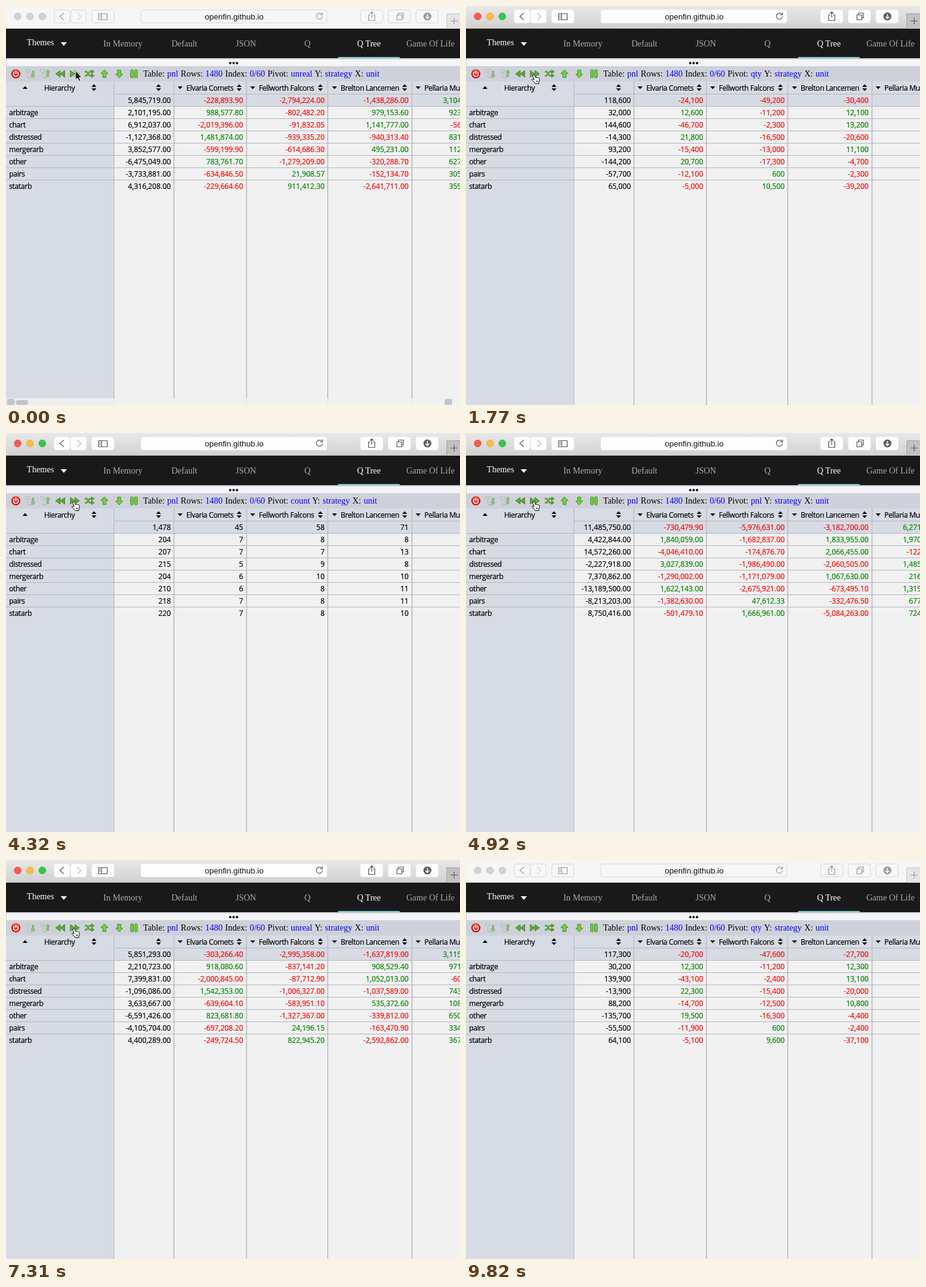
These frames come from a looping animation (738x650 px, 9920 ms). An HTML page:

```html
<!DOCTYPE html>
<html lang="en">
<head>
<meta charset="utf-8">
<title>Pivot grid</title>
<style>
  html, body { margin: 0; width: 100%; height: 100%; overflow: hidden; background: #f1f1f1; }
  svg { display: block; }
  text { white-space: pre; }
  .grid text {
    font: 11.8px "Open Sans", "Noto Sans", sans-serif;
    fill: currentColor; stroke: currentColor; stroke-width: .22px;
  }
  .grid .label { letter-spacing: -.33px; }
  .num { text-anchor: end; }
  .nav text, .status { font: 14px "Liberation Serif", "Times New Roman", serif; }
  .nav text { fill: #a9a9a9; text-anchor: middle; }
  .nav .lit { fill: #fff; }
  .status { word-spacing: .7px; }
  .status tspan { fill: #00f; }
  .url { font: 13px "Liberation Sans", Arial, sans-serif; fill: #111; text-anchor: middle; }
  .btn { fill: #fdfdfd; stroke: #f6f6f6; }
  .glyph { fill: none; stroke: #5a5a5a; stroke-width: 1.2; }
  .solid { fill: #5f5f5f; stroke: none; }
  .edge { fill: #b4b3b4; }
  .tab { fill: #c2c1c2; stroke: #a3a3a3; }
  .idle .bar { fill: #f6f6f6; }
  .idle .btn { fill: #f7f7f7; stroke: #d9d9d9; }
  .idle .glyph { stroke: #9b9b9b; }
  .idle .solid { fill: #9b9b9b; stroke: none; }
  .idle .edge { fill: #dadada; }
  .idle .tab { fill: #e4e4e4; stroke: #c8c8c8; }
  .idle .lamp { fill: #d2d2d2; stroke: #c2c2c2; }
  .green { fill: #74cf3a; stroke: #3c8a22; stroke-width: .9; stroke-linejoin: round; }
  .deep { fill: #5fa63e; }
  .faint { opacity: .65; }
  .dash { fill: none; stroke: #8aa087; stroke-dasharray: 1.5 1; }
</style>
</head>
<body>
<svg id="stage" width="738" height="650" viewBox="0 0 738 650">
  <defs>
    <linearGradient id="chrome" x2="0" y2="1">
      <stop stop-color="#e9e8e9"/><stop offset="1" stop-color="#d2d1d2"/>
    </linearGradient>
    <radialGradient id="red" cy=".3">
      <stop stop-color="#ff6a60"/><stop offset="1" stop-color="#d01414"/>
    </radialGradient>
    <path id="down" d="M-4 -2H4L0 2.5Z"/>
    <path id="sort" d="M-4 -1.2H4L0 -5.5ZM-4 1.2H4L0 5.5Z"/>
    <path id="skip" d="M-7.5 -5.5L0 0L-7.5 5.5ZM0 -5.5L7.5 0L0 5.5Z"/>
    <path id="arrow" d="M0 -6.5L6 -.5H2.7V6H-2.7V-.5H-6Z"/>
    <path id="small" d="M0 -6L3.2 -2H1.3V5H-1.3V-2H-3.2Z"/>
    <path id="boxes" class="dash" d="M.5 .5H6.5V5H.5ZM3.5 5V13H9M6.5 8.5H9.5V14.5H4"/>
    <path id="cross" d="M128 107H131L136 113.5H140M128 113.5H131L136 107H140" fill="none"/>
  </defs>

  <g id="window">
    <rect class="bar" width="738" height="37" fill="url(#chrome)"/>
    <rect class="edge" id="edge" y="36" width="738" height="1"/>
    <circle class="lamp" cx="19" cy="17" r="5.7" fill="#fc5753" stroke="#df4744" stroke-width=".7"/>
    <circle class="lamp" cx="39" cy="17" r="5.7" fill="#fdbc40" stroke="#de9f34" stroke-width=".7"/>
    <circle class="lamp" cx="59" cy="17" r="5.7" fill="#34c84a" stroke="#27aa35" stroke-width=".7"/>
    <g id="buttons"></g>
    <path class="glyph" d="M94 11.5L87.5 17L94 22.5"/>
    <path class="glyph" opacity=".4" d="M116 11.5L122 17L116 22.5"/>
    <path class="glyph" d="M150.5 12.5H164.5V22.5H150.5ZM155.5 12.5V22.5M152 15H154M152 17H154M152 19H154"/>
    <text class="url" x="371" y="22">openfin.github.io</text>
    <path class="glyph" d="M513.5 13.5A5 5 0 1 0 514.5 17M514.5 10.5V14.5H510.5"/>
    <path class="glyph" d="M592 14.5H589.5V23.5H599.5V14.5H597M594.5 19V9.5M591.5 12.5L594.5 9.5L597.5 12.5"/>
    <path class="glyph" d="M635.5 14.5H643.5V22.5H635.5ZM638 14V11.5H646V19.5H644"/>
    <circle class="glyph solid" cx="685" cy="17" r="6.5"/>
    <path d="M685 13V20M682 17.5L685 20.5L688 17.5" fill="none" stroke="#fff" stroke-width="1.5"/>
    <rect class="tab" x="716.5" y="12.5" width="24" height="25"/>
    <path class="glyph" d="M723 24.5H734M728.5 19V30"/>
  </g>

  <g class="nav" id="nav">
    <rect y="37" width="738" height="48" fill="#191919"/>
    <rect x="540" y="83" width="100" height="2" fill="#76c7cb"/>
    <text class="lit" x="56" y="64">Themes</text>
    <path d="M89 59H99L94 65Z" fill="#fff"/>
  </g>

  <rect y="85" width="738" height="14" fill="#d0d2da"/>
  <rect x="1" y="87" width="737" height="11" fill="#f5f5f7"/>
  <path d="M364.5 93h.01M370 93h.01M375.5 93h.01" stroke="#111" stroke-width="4" stroke-linecap="round"/>
  <rect y="98" width="738" height="25" fill="#cfd1da"/>

  <g id="tools">
    <circle cx="16" cy="110.5" r="7.5" fill="url(#red)"/>
    <path d="M13.5 107.7A4 4 0 1 0 18.5 107.7M16 105.5V110.5" fill="none" stroke="#fff" stroke-width="1.5"/>
    <g class="faint">
      <use href="#boxes" x="32" y="103"/>
      <use href="#small" class="green" transform="translate(44 111) rotate(180)"/>
      <use href="#boxes" x="56" y="103"/>
      <use href="#small" class="green" transform="translate(68 110)"/>
    </g>
    <use href="#skip" class="green deep" transform="translate(88 110.5) scale(-1 1)"/>
    <use href="#skip" class="green deep" transform="translate(112 110.5)"/>
    <use href="#cross" stroke="#3c8a22" stroke-width="2.4"/>
    <use href="#cross" stroke="#74cf3a"/>
    <path class="green deep" d="M139 104L143.5 107L139 110ZM139 110.5L143.5 113.5L139 116.5Z"/>
    <use href="#arrow" class="green" transform="translate(160 110.5)"/>
    <use href="#arrow" class="green" transform="translate(184 110.5) rotate(180)"/>
    <rect class="green" x="202.5" y="104" width="4.5" height="13" rx="1.5"/>
    <rect class="green" x="209" y="104" width="4.5" height="13" rx="1.5"/>
  </g>
  <text class="status" x="223" y="115">Table: <tspan>pnl</tspan> Rows: <tspan>1480</tspan> Index: <tspan>0/60</tspan> Pivot: <tspan id="pivot">unreal</tspan> Y: <tspan>strategy</tspan> X: <tspan>unit</tspan></text>

  <g class="grid" id="grid">
    <rect y="123" width="738" height="527" fill="#f1f1f1"/>
    <rect y="123" width="738" height="40" fill="#d7dbe3"/>
    <rect y="123" width="175" height="527" fill="#d7dbe3"/>
    <path id="columns" fill="none" stroke="#c3c6cd" stroke-width="2"/>
    <path id="rows" fill="none" stroke="#b2b6be"/>
    <text class="label" x="62" y="138">Hierarchy</text>
    <use href="#down" transform="translate(31 133) scale(1 -1)"/>
    <use href="#sort" x="143" y="133"/>
    <use href="#sort" x="248" y="133"/>
  </g>

  <g id="scroll">
    <rect x="1" y="639" width="724" height="11" fill="#f1f1f1" opacity=".85"/>
    <g fill="#c0c6cc">
      <rect x="2" y="640" width="12" height="11" rx="3"/>
      <rect x="16" y="642" width="20" height="8" rx="4"/>
      <rect x="713" y="640" width="12" height="11" rx="3"/>
    </g>
  </g>

  <path id="pointer" d="M0 0V14.5L3.4 11.4L5.8 16.7L8.3 15.6L6 10.4H10.5Z" fill="#111" stroke="#fff"/>
  <path id="hand" transform="translate(106 111)" fill="#fff" stroke="#111" stroke-linejoin="round"
    d="M3 1.5Q4.5 .2 5.5 1.8L7.2 5.8Q8.2 4.8 9.2 5.7Q10.3 5 11.2 6Q12.8 5.6 13.3 7.2L13.5 10L12.5 13V15.5H6.5L5 13L1.5 9.8Q.6 8 2.4 8L4.8 9.3L2.6 3Q2.4 2 3 1.5ZM8.3 10.5V13M10.3 10.5V13"/>
</svg>

<script>
const LOOP = 9920;
const $ = id => document.getElementById(id);

function add(parent, tag, attrs, text = '') {
  const el = document.createElementNS('http://www.w3.org/2000/svg', tag);
  for (const key in attrs) el.setAttribute(key, attrs[key]);
  el.textContent = text;
  return parent.appendChild(el);
}

// Window and navigation
for (const [x, width] of [[78, 26], [105, 26], [139, 37], [219, 303], [576, 37], [621, 37], [666, 37]])
  add($('buttons'), 'rect', { class: 'btn', x: x + .5, y: 6.5, width: width - 1, height: 21, rx: 3.5 });

['In Memory', 'Default', 'JSON', 'Q', 'Q Tree', 'Game Of Life'].forEach((name, i) =>
  add($('nav'), 'text', { x: 190 + i * 100, y: 66, class: name === 'Q Tree' ? 'lit' : '' }, name));

// Grid frame
const rowLines = Array.from({ length: 7 }, (_, i) => `M0 ${163.5 + i * 20}H738`).join('');
$('rows').setAttribute('d', 'M175.5 123V650M175 143.5H738' + rowLines);
$('columns').setAttribute('d', [273, 391, 523, 660].map(x => `M${x} 123V650`).join(''));

for (const [x, name, sortX] of [[293, 'Elvaria Comets', 379], [411, 'Fellworth Falcons', 511],
                                [544, 'Brelton Lancemen', 648], [680, 'Pellaria Mules', 784]]) {
  add($('grid'), 'use', { href: '#down', x: x - 10, y: 133 });
  add($('grid'), 'text', { class: 'label', x, y: 138 }, name);
  add($('grid'), 'use', { href: '#sort', x: sortX, y: 133 });
}

// Profit per strategy, in ten thousands: overall, then the four visible units
const profit = {
  arbitrage: [442, 184, -168, 183, 197],
  chart: [1457, -405, -17, 207, -12],
  distressed: [-223, 303, -199, -206, 149],
  mergerarb: [737, -129, -117, 107, 22],
  other: [-1319, 162, -268, -67, 132],
  pairs: [-821, -138, 5, -33, 68],
  statarb: [875, -50, 167, -508, 72]
};
const keys = Object.values(profit);

Object.keys(profit).forEach((name, i) =>
  add($('grid'), 'text', { class: 'label', x: 5, y: 178 + i * 20 }, name));

const cells = Array.from({ length: 8 }, (_, row) =>
  [268, 385.5, 518, 654.5, 780].map(x =>
    add($('grid'), 'text', { class: 'num', x, y: 158 + row * 20 })));

// Repeatable value from -1 to 1
function noise(seed, row, col) {
  const x = Math.sin(seed * 12.9 + row * 78.2 + col * 37.7) * 43758.5;
  return (x - Math.floor(x)) * 2 - 1;
}

const derive = (table, fn) => table.map((line, r) => line.map((v, c) => fn(v, r, c)));
const withNoise = (table, seed, fn) => derive(table, (v, r, c) => fn(v, noise(seed, r, c), c));

const pnl = withNoise(keys, 1, (v, n) => v * 1e4 + n * 4900);
const unrealA = withNoise(pnl, 2, (v, n) => v * (.5 + n * .06));
const unrealB = withNoise(pnl, 3, (v, n) => v * (.5 + n * .01));
const real = derive(pnl, (v, r, c) => v - unrealB[r][c]);
const qtyA = withNoise(pnl, 4, (v, n) => Math.round(v / (120 + n * 45) / 100) * 100);
const qtyB = withNoise(qtyA, 5, (v, n) => Math.round(v * (.97 + n * .07) / 100) * 100);
const typical = [18740, 535, 670, 880, 560];
const trades = withNoise(keys, 6, (_, n, c) => Math.round(typical[c] * (1 + n * (c ? .3 : .04))));
const volume = derive(trades, v => v * 490);
const count = derive(trades, v => Math.round(v * 1480 / 131175));

// [start, table, decimals, signed colours]
const scenes = [
  [0, unrealA, 2, true], [1480, qtyA, 0, true], [2670, volume, 0, false],
  [3420, trades, 0, false], [4020, count, 0, false], [4770, pnl, 2, true],
  [6270, real, 2, true], [7020, unrealB, 2, true], [7760, qtyB, 0, true]
];
const pivots = [
  [0, 'unreal'], [1770, 'qty'], [2820, 'volume'], [3870, 'trades'], [4320, 'count'],
  [4920, 'pnl'], [6420, 'real'], [7310, 'unreal'], [7910, 'qty']
];

// Amounts carry seven significant digits, padded to the given decimals
const format = (value, digits) => Number(digits ? value.toPrecision(7) : value)
  .toLocaleString('en-US', { minimumFractionDigits: digits, maximumFractionDigits: digits });

function drawTable([, table, digits, signed]) {
  const totals = table.reduce((sum, line) => sum.map((v, c) => v + line[c]));
  [totals, ...table].forEach((line, r) => line.forEach((value, c) => {
    cells[r][c].textContent = format(value, digits);
    cells[r][c].style.color = !signed || c === 0 ? '#000' : value < 0 ? '#f00' : '#008000';
  }));
}

const current = (list, t) => list.findLast(item => item[0] <= t);
const show = (id, on) => { $(id).style.visibility = on ? 'visible' : 'hidden'; };
let scene, start;

function render(now) {
  start ??= now;
  const t = (now - start) % LOOP;
  const next = current(scenes, t);
  if (next !== scene) drawTable(scene = next);
  $('pivot').textContent = current(pivots, t)[1];

  $('window').classList.toggle('idle', t < 600 || t >= 9820);
  $('edge').style.opacity = t >= 600 && t < 740 ? .5 : 1;
  $('scroll').style.opacity = t < 890 ? 1 : t < 1040 ? .5 : 0;

  const moved = t >= 8810;
  $('pointer').setAttribute('transform', moved ? 'translate(493 257)' : 'translate(113 106)');
  show('pointer', t < 150 || (moved && t < 8960));
  show('hand', t >= 150 && !moved);
  requestAnimationFrame(render);
}
drawTable(scene = scenes[0]);
requestAnimationFrame(render);
</script>
</body>
</html>
```
